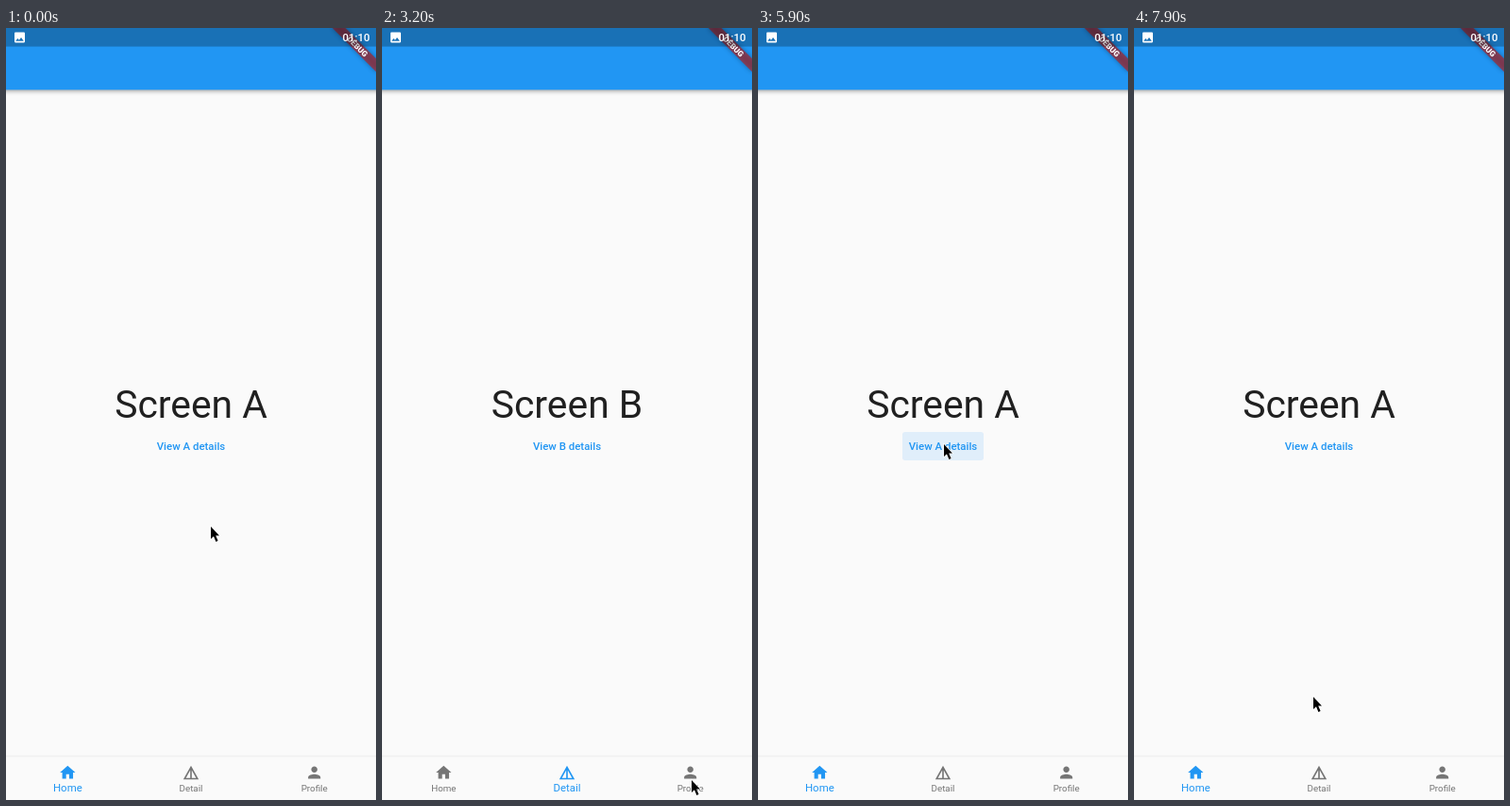
An HTML page with a canvas that plays this animation: 392x816 px, repeating every 8 s.

```html
<!DOCTYPE html>
<html lang="en">
<head>
<meta charset="utf-8">
<title>Tab navigation</title>
<style>
html, body { margin: 0; width: 100%; height: 100%; overflow: hidden; background: #fafafa; }
canvas { display: block; width: 392px; height: 816px; }
</style>
</head>
<body>
<canvas id="stage" width="392" height="816"></canvas>
<script>
const W = 392, H = 816, LOOP = 8000, STEP = 100;
const U = W / 480; // stage pixels per logical pixel
const BLUE = [33, 150, 243], GREY = [117, 117, 117];
const PAPER = '#fafafa';
const BAR_BOTTOM = 80 * U, STATUS_BOTTOM = 24 * U, NAV_TOP = H - 56 * U;
const ctx = document.getElementById('stage').getContext('2d');

const ICONS = {
  home: new Path2D('M10 20v-6h4v6h5v-8h3L12 3 2 12h3v8z'),
  detail: new Path2D('M12 3L2 21h20L12 3zm1 5.92L18.6 19H13V8.92zm-2 0V19H5.4L11 8.92z'),
  person: new Path2D('M12 12c2.21 0 4-1.79 4-4s-1.79-4-4-4-4 1.79-4 4 1.79 4 4 4zm0 2c-2.67 0-8 1.34-8 4v2h16v-2c0-2.66-5.33-4-8-4z'),
  back: new Path2D('M20 11H7.83l5.59-5.59L12 4l-8 8 8 8 1.41-1.41L7.83 13H20v-2z'),
  image: new Path2D('M21 19V5c0-1.1-.9-2-2-2H5c-1.1 0-2 .9-2 2v14c0 1.1.9 2 2 2h14c1.1 0 2-.9 2-2zM8.5 13.5l2.5 3.01L14.5 12l4.5 6H5l3.5-4.5z')
};
const POINTER = new Path2D('M0 0V13L3 10.2L5.4 16L7.6 15L5.2 9.4H9Z');

const TABS = [
  { icon: 'home', label: 'Home', screen: 'A' },
  { icon: 'detail', label: 'Detail', screen: 'B' },
  { icon: 'person', label: 'Profile', screen: 'C' }
];
const TAPS = [{ t: 0, tab: 0 }, { t: 1800, tab: 1 }, { t: 3600, tab: 2 }, { t: 4900, tab: 0 }];
const OPEN_AT = 5900, BACK_AT = 7200;

// time, x, y of the pointer tip
const ROUTE = [
  [0, 217, 527], [900, 194, 746], [1400, 190, 789], [2700, 190, 789],
  [3200, 328, 795], [4000, 328, 795], [4600, 74, 787], [5100, 74, 787],
  [5600, 197, 440], [6000, 197, 440], [6500, 32, 62], [6700, 36, 47],
  [6900, 25, 44], [7300, 25, 44], [7900, 190, 707]
];

const clamp = v => Math.max(0, Math.min(1, v));
const mix = (a, b, p) => a + (b - a) * p;
const smooth = p => p * p * (3 - 2 * p);
const tabX = i => W * (i + 0.5) / 3;

function text(str, x, y, size, color, weight = 400, align = 'center') {
  ctx.font = `${weight} ${size * U}px Roboto, sans-serif`;
  ctx.textAlign = align;
  ctx.fillStyle = color;
  ctx.fillText(str, x, y);
}

function icon(name, x, y, color, size = 24) {
  const k = size * U / 24;
  ctx.save();
  ctx.translate(x, y);
  ctx.scale(k, k);
  ctx.translate(-12, -12);
  ctx.fillStyle = color;
  ctx.fill(ICONS[name]);
  ctx.restore();
}

function ripple(age, x, y, top, bottom, color, strength) {
  if (age < 0 || age >= 300) return;
  ctx.save();
  ctx.beginPath();
  ctx.rect(0, top, W, bottom - top);
  ctx.clip();
  ctx.globalAlpha = strength * clamp((300 - age) / 200);
  ctx.fillStyle = color;
  ctx.beginPath();
  ctx.arc(x, y, 35 * U * mix(0.4, 1, clamp(age / 100)), 0, Math.PI * 2);
  ctx.fill();
  ctx.restore();
}

function drawScreen(name, t) {
  ctx.fillStyle = PAPER;
  ctx.fillRect(0, 0, W, H);
  const press = t - OPEN_AT;
  if (press >= 0 && press < 300) {
    ctx.fillStyle = `rgba(33,150,243,${0.12 * (1 - press / 300)})`;
    ctx.beginPath();
    ctx.roundRect(153, 427, 86, 30, 3);
    ctx.fill();
  }
  text('Screen ' + name, W / 2, 412, 50, '#202020');
  text(`View ${name} details`, W / 2, 446, 14, '#2196f3', 500);
}

function drawAppBar() {
  ctx.save();
  ctx.shadowColor = 'rgba(0,0,0,.4)';
  ctx.shadowBlur = 5;
  ctx.shadowOffsetY = 1.5;
  ctx.fillStyle = '#2196f3';
  ctx.fillRect(-10, -10, W + 20, BAR_BOTTOM + 10);
  ctx.restore();
}

function drawDetails(alpha) {
  ctx.globalAlpha = alpha;
  text('Details for A', W / 2, 428, 34, '#757575');
  text('Details Screen', 72 * U, 48.5, 20, '#fff', 500, 'left');
  icon('back', 28 * U, 42.5, '#fff');
  ctx.globalAlpha = 1;
}

function drawNav(t) {
  ctx.save();
  ctx.shadowColor = 'rgba(0,0,0,.14)';
  ctx.shadowBlur = 3;
  ctx.fillStyle = PAPER;
  ctx.fillRect(-10, NAV_TOP, W + 20, 70);
  ctx.restore();

  const now = TAPS.findLastIndex(tap => t >= tap.t);
  const active = TAPS[now].tab;
  const previous = now ? TAPS[now - 1].tab : -1;
  const p = now ? smooth(clamp((t - TAPS[now].t + 50) / 200)) : 1;
  if (now) ripple(t - TAPS[now].t, tabX(active), NAV_TOP + 28 * U, NAV_TOP - 1, H, '#c0c0c0', 0.24);

  TABS.forEach((tab, i) => {
    const on = i === active ? p : i === previous ? 1 - p : 0;
    const color = `rgb(${GREY.map((g, c) => Math.round(mix(g, BLUE[c], on)))})`;
    icon(tab.icon, tabX(i), 787, color);
    text(tab.label, tabX(i), 807, mix(12, 14, on), color);
  });
}

function drawBanner() {
  ctx.save();
  ctx.translate(W, 0);
  ctx.rotate(Math.PI / 4);
  ctx.shadowColor = 'rgba(0,0,0,.5)';
  ctx.shadowBlur = 5;
  ctx.fillStyle = 'rgba(183,28,28,.63)';
  ctx.fillRect(-40 * U, 28 * U, 80 * U, 12 * U);
  ctx.shadowColor = 'transparent';
  text('DEBUG', 0, 37.6 * U, 10.2, '#fff', 900);
  ctx.restore();
}

function drawStatus() {
  ctx.fillStyle = 'rgba(0,0,0,.25)';
  ctx.fillRect(0, 0, W, STATUS_BOTTOM);
  icon('image', 14.5, 10, '#fff', 18);
  text('01:10', 385.5, 14, 14, '#fff', 500, 'right');
}

function drawPointer(t) {
  let i = ROUTE.findLastIndex(stop => t >= stop[0]);
  const a = ROUTE[i], b = ROUTE[i + 1] || a;
  const p = b === a ? 0 : smooth((t - a[0]) / (b[0] - a[0]));
  ctx.save();
  ctx.translate(mix(a[1], b[1], p), mix(a[2], b[2], p));
  ctx.strokeStyle = '#fff';
  ctx.lineWidth = 1.2;
  ctx.stroke(POINTER);
  ctx.fillStyle = '#000';
  ctx.fill(POINTER);
  ctx.restore();
}

function detailsAlpha(t) {
  return t < BACK_AT ? clamp((t - OPEN_AT) / 300) : 1 - clamp((t - BACK_AT - 34) / 300);
}

function draw(t) {
  const shown = detailsAlpha(t);
  const tap = TAPS.findLast(item => t >= item.t);
  drawScreen(TABS[tap.tab].screen, t);
  if (shown > 0) {
    ctx.globalAlpha = shown;
    ctx.fillStyle = PAPER;
    ctx.fillRect(0, 0, W, H);
    ctx.globalAlpha = 1;
  }
  drawAppBar();
  ripple(t - BACK_AT, 28 * U, 42.5, 0, BAR_BOTTOM, '#c8c8c8', 0.2);
  if (shown > 0) drawDetails(shown);
  drawNav(t);
  drawBanner();
  drawStatus();
  drawPointer(t);
}

const start = performance.now();
function tick() {
  const t = (performance.now() - start) % LOOP;
  draw(Math.floor(t / STEP) * STEP);
  requestAnimationFrame(tick);
}
tick();
</script>
</body>
</html>
```
